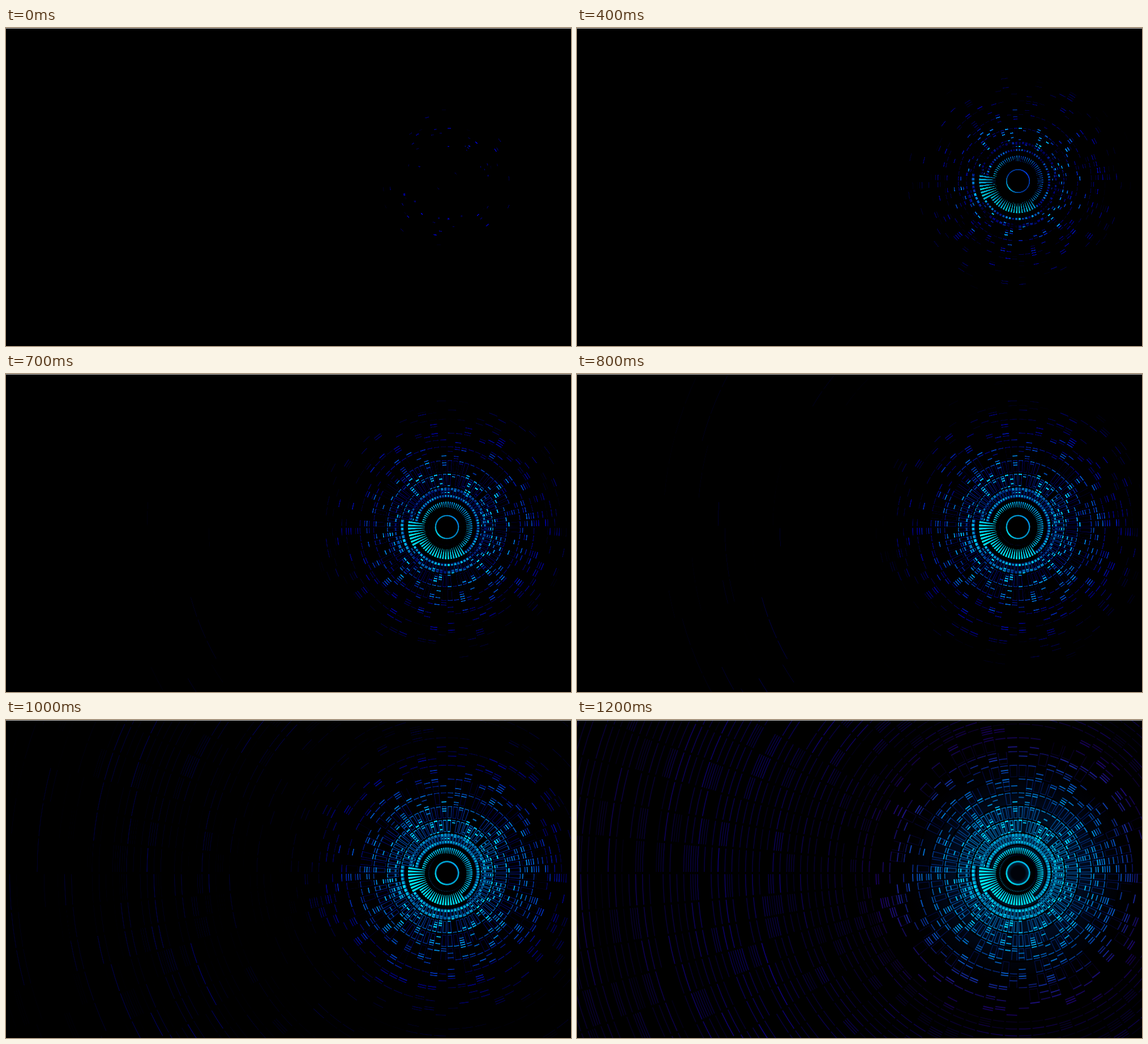
An HTML page with a canvas for the animation above (1.4 s loop, 998 by 561 pixels).

```html
<!DOCTYPE html>
<html lang="en">
<head>
<meta charset="utf-8">
<title>Radial reveal</title>
<style>
  html, body { margin: 0; width: 100%; height: 100%; overflow: hidden; background: #000; }
  canvas { display: block; }
</style>
</head>
<body>
<canvas id="stage" width="998" height="561"></canvas>
<script>
const W = 998, H = 561, CX = 779, CY = 270;
const LOOP = 1400, STEP = 100, STEPS = 13;
const TAU = Math.PI * 2, SECTORS = 72, SECTOR = TAU / SECTORS;
const R0 = 69, PITCH = 12.13;
const ringRadius = k => R0 + k * PITCH;
const deg = d => d * Math.PI / 180;
const clamp = t => Math.max(0, Math.min(1, t));
const smooth = t => (t = clamp(t)) * t * (3 - 2 * t);
const bell = (x, mid, width) => Math.exp(-(((x - mid) / width) ** 2));

let seed = 4127;
function rnd() {
  seed = (seed * 1664525 + 1013904223) >>> 0;
  return seed / 4294967296;
}
const between = (a, b) => a + (b - a) * rnd();

// Cyan in the middle, blue further out, dim violet in the far field.
function ink(r, level) {
  const red = 18 * bell(r, 225, 40) + 12 * smooth((r - 150) / 100);
  const green = 238 * (1 - smooth((r - 70) / 190));
  const blue = 253 - 188 * clamp((r - 90) / 175) ** 1.7 + 42 * bell(r, 500, 130);
  return `rgb(${red * level},${green * level ** 1.8},${blue * level})`;
}

const base = document.createElement('canvas');
base.width = W;
base.height = H;
const g = base.getContext('2d');

function arc(r, from, to, width, color) {
  g.lineWidth = width;
  g.strokeStyle = color;
  g.beginPath();
  g.arc(CX, CY, r, from, to);
  g.stroke();
}
function disc(r, fill) {
  g.fillStyle = fill;
  g.beginPath();
  g.arc(CX, CY, r, 0, TAU);
  g.fill();
}
function dash(r, s, level, width = 2) {
  const pad = Math.min(2, 0.7 + r / 300) / r;
  arc(r, s * SECTOR + pad, (s + 1) * SECTOR - pad, width, ink(r, level));
}
function spoke(a, r1, r2, w1, w2, color) {
  g.save();
  g.translate(CX, CY);
  g.rotate(a);
  g.fillStyle = color;
  g.beginPath();
  g.moveTo(r1, -w1 / 2);
  g.lineTo(r2, -w2 / 2);
  g.lineTo(r2, w2 / 2);
  g.lineTo(r1, w1 / 2);
  g.fill();
  g.restore();
}

// The spokes step outwards from the top round to the left.
function spokeEnd(s) {
  const d = s * 5;
  const steps = d >= 150 && d < 190 ? 2 : d >= 55 && d < 150 ? 1 : 0;
  return 45 + steps * 12;
}

function drawFarField() {
  for (let k = 16; k < 66; k++) {
    const r = ringRadius(k), strong = k % 4 === 1 || k % 4 === 2;
    let level = 0;
    for (let s = 0; s < SECTORS; s++) {
      if (s % 3 === 0 || rnd() < 0.3)
        level = strong ? 0.5 + 0.65 * rnd() ** 2 : rnd() < 0.7 ? between(0.25, 0.65) : 0;
      if (level) dash(r, s, level, 1.7);
      if (rnd() < 0.11) {
        const dim = between(0.35, 0.75);
        for (let n = 0; n < 3; n++) dash(r + n * 4, s, dim, 1.5);
      }
    }
  }
}

function drawHaze() {
  const haze = g.createRadialGradient(CX, CY, 38, CX, CY, 200);
  haze.addColorStop(0, 'rgba(0,40,80,.5)');
  haze.addColorStop(0.5, 'rgba(0,24,70,.4)');
  haze.addColorStop(1, 'rgba(0,0,30,0)');
  disc(200, haze);
}

function drawBoxes() {
  for (let s = 0; s < SECTORS; s++) {
    const shift = s >= 45 && s < 68 ? 0 : 1;
    let inner = spokeEnd(s) + 3;
    for (let k = -shift; k < 15; k += 2) {
      const outer = ringRadius(k), start = inner + 4;
      if (outer <= start) continue;
      const fade = smooth((outer - 80) / 130);
      const side = between(0.55, 0.7) - 0.4 * fade;
      arc(inner + 2.5, s * SECTOR, (s + 1) * SECTOR, 3, '#000');
      if (rnd() < 1 - 0.6 * fade) {
        const edge = Math.min(2, outer / 65) / outer;
        for (const a of [s * SECTOR + edge, (s + 1) * SECTOR - edge])
          spoke(a, start, outer, 1.3, 1.7, ink(outer, side));
        dash(start, s, side, 1.4);
      }
      if (rnd() < 1 - 0.3 * fade) dash(outer, s, between(0.65, 0.86) - 0.15 * fade, 2);
      inner = outer;
    }
  }
}

function drawDashes() {
  for (let s = 0; s < SECTORS; s++) {
    let lit = false;
    for (let r = spokeEnd(s) + 16; r < 268; r += PITCH / 3) {
      const chance = 0.19 - 0.0005 * (r - R0);
      lit = rnd() < (lit ? 0.33 : chance);
      if (lit) dash(r, s, between(0.64, 1), r < 110 ? 2.5 : 2);
    }
  }
}

function drawSpokes() {
  for (let s = 0; s < SECTORS; s++) {
    const a = (s + 0.5) * SECTOR, end = spokeEnd(s);
    const light = smooth(0.5 + 0.5 * Math.cos(a - deg(140)));
    const wide = end * SECTOR * 0.7;
    spoke(a, 34 + 5 * light, end, 0.9, wide, `rgb(0,${between(175, 192) + 42 * light},${218 + 16 * light})`);
    dash(end + 10, s, between(0.75, 0.92) + 0.06 * light, 4);
    dash(end + 22, s, between(0.62, 0.85), 3.5);
    spoke(a, 31, 33.5, 1, 1.4, `rgb(0,${95 * light},${50 + 75 * light})`);
  }
}

function drawCore() {
  const glow = g.createRadialGradient(CX, CY, 12, CX, CY, 21);
  glow.addColorStop(0, '#00030a');
  glow.addColorStop(0.6, '#001c35');
  glow.addColorStop(1, '#006d92');
  disc(21, glow);
  for (let d = 0; d < 360; d++) {
    const green = 195 + 48 * Math.max(0, Math.cos(deg(d - 145))) ** 4;
    const blue = 228 + 24 * Math.cos(deg(d + 35)) ** 4;
    arc(20.3, deg(d), deg(d + 1.5), 2.5, `rgb(0,${green},${blue})`);
  }
}

g.fillStyle = '#000';
g.fillRect(0, 0, W, H);
drawFarField();
drawHaze();
drawBoxes();
drawDashes();
disc(40, '#000');
drawSpokes();
drawCore();

const ctx = document.getElementById('stage').getContext('2d');
let shown = -1;

// Each step burns the finished picture a little less.
function render(step) {
  const v = Math.round(255 * (step + 1) / STEPS);
  ctx.globalCompositeOperation = 'source-over';
  ctx.drawImage(base, 0, 0);
  ctx.globalCompositeOperation = 'color-burn';
  ctx.fillStyle = `rgb(${v},${v},${v})`;
  ctx.fillRect(0, 0, W, H);
  ctx.globalCompositeOperation = 'source-over';
  ctx.fillStyle = '#c8c8c8';
  ctx.fillRect(0, 0, W, 1);
}

const origin = performance.now();
function tick() {
  const t = (performance.now() - origin) % LOOP;
  const step = Math.min(STEPS - 1, Math.floor(t / STEP));
  if (step !== shown) render(shown = step);
  requestAnimationFrame(tick);
}
tick();
</script>
</body>
</html>
```
